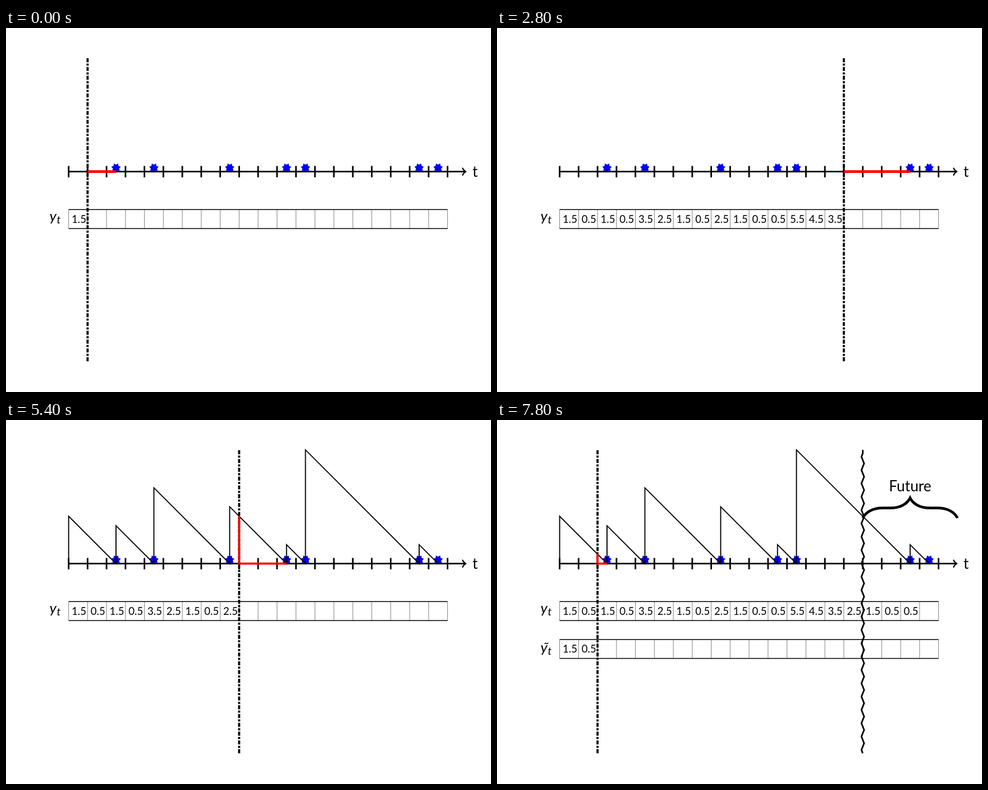
Recreate the animation shown at these times as an HTML page with a canvas. Size 864x648 px, loop 8 s.

```html
<!DOCTYPE html>
<html lang="en">
<head>
<meta charset="utf-8">
<title>Time to next event</title>
<style>
html, body { margin: 0; width: 100%; height: 100%; overflow: hidden; background: #fff; }
canvas { display: block; }
</style>
</head>
<body>
<canvas id="stage" width="864" height="648"></canvas>
<script>
const ctx = document.getElementById('stage').getContext('2d');
const STEP = 200, LOOP = 8000;
const PT = 2.372;               // one typographic point in pixels
const U = 33.75;                // one time unit in pixels
const X0 = 111.6, Y0 = 255.7;   // origin of the time axis
const CELLS = 20;
const NOW = 16;
const EVENTS = [2.5, 4.5, 8.5, 11.5, 12.5, 18.5, 19.5];

const px = t => X0 + t * U;
const py = v => Y0 - v * U;
const nextEvent = t => EVENTS.find(e => e > t);

function stroke(points, width, color = '#000', dash = []) {
  ctx.beginPath();
  points.forEach(([x, y]) => ctx.lineTo(x, y));
  ctx.lineWidth = width;
  ctx.strokeStyle = color;
  ctx.setLineDash(dash);
  ctx.stroke();
  ctx.setLineDash([]);
}

function text(str, x, y, size, align = 'left', style = '') {
  ctx.font = `${style} ${size}px Lato, "Open Sans", sans-serif`;
  ctx.textAlign = align;
  ctx.fillStyle = '#000';
  ctx.fillText(str, x, y);
}

function star(cx, cy) {
  const points = 7, outer = 8.6, inner = 5.7;
  ctx.beginPath();
  for (let i = 0; i < points * 2; i++) {
    const a = Math.PI / 2 + i * Math.PI / points;
    const r = i % 2 ? inner : outer;
    ctx.lineTo(cx + r * Math.cos(a), cy + r * Math.sin(a));
  }
  ctx.fillStyle = '#00f';
  ctx.fill();
}

function axis() {
  const w = 1.2 * PT, end = px(21), tip = end - 0.96 * PT, a = 0.64 * PT;
  stroke([[px(0), Y0], [tip, Y0]], w);
  for (let i = 0; i <= CELLS; i++) stroke([[px(i), py(0.3)], [px(i), py(-0.3)]], w);
  ctx.save();
  ctx.translate(tip, Y0);
  ctx.lineCap = ctx.lineJoin = 'round';
  ctx.lineWidth = 0.8 * w;
  ctx.strokeStyle = '#000';
  ctx.beginPath();
  ctx.moveTo(-3 * a, -4 * a);
  ctx.bezierCurveTo(-2.75 * a, -2.5 * a, 0, -0.25 * a, 0.75 * a, 0);
  ctx.bezierCurveTo(0, 0.25 * a, -2.75 * a, 2.5 * a, -3 * a, 4 * a);
  ctx.stroke();
  ctx.restore();
  text('t', 831, 264.5, 26);
}

function row(level, filled) {
  const top = py(level), bottom = py(level - 1);
  for (let i = 0; i <= CELLS; i++) stroke([[px(i), top], [px(i), bottom]], 0.5);
  for (const y of [top, bottom]) stroke([[px(0), y], [px(CELLS), y]], 0.6 * PT);
  for (let i = 1; i <= filled; i++) {
    text((nextEvent(i) - i).toFixed(1), px(i - 1) + 18.4, top + 23.4, 18.5, 'center');
  }
}

function rowLabel(baseline) {
  text('y', 77.5, baseline, 26, 'left', 'italic');
  text('t', 90.5, baseline + 4, 19, 'left', 'italic');
}

function sawtooth() {
  const points = [];
  [0, ...EVENTS].forEach((e, i, all) => {
    points.push([px(e), Y0]);
    if (i < all.length - 1) points.push([px(e), py(all[i + 1] - e)]);
  });
  stroke(points, 0.8 * PT);
}

function zigzag() {
  const x = px(NOW), top = py(6), bottom = py(-10);
  const half = 5 * PT, amp = PT;
  const count = Math.floor((bottom - top) / half);
  const points = [[x, bottom]];
  for (let i = 0; i < count; i++) {
    points.push([x + (i % 2 ? amp : -amp), bottom - (i + 0.5) * half]);
  }
  points.push([x, bottom - count * half], [x, top]);
  stroke(points, 1.2 * PT);
}

function brace() {
  const a = 15 * PT, half = 2.5 * U;
  ctx.save();
  ctx.translate(px(NOW) + half, 174.5);
  ctx.lineWidth = 2 * PT;
  ctx.strokeStyle = '#000';
  ctx.beginPath();
  ctx.moveTo(-half, 0);
  ctx.bezierCurveTo(-half + 0.15 * a, -0.3 * a, -half + 0.5 * a, -0.5 * a, -half + a, -0.5 * a);
  ctx.lineTo(-a, -0.5 * a);
  ctx.bezierCurveTo(-0.5 * a, -0.5 * a, -0.15 * a, -0.7 * a, 0, -a);
  ctx.bezierCurveTo(0.15 * a, -0.7 * a, 0.5 * a, -0.5 * a, a, -0.5 * a);
  ctx.lineTo(half - a, -0.5 * a);
  ctx.bezierCurveTo(half - 0.5 * a, -0.5 * a, half - 0.15 * a, -0.3 * a, half, 0);
  ctx.stroke();
  ctx.restore();
  text('Future', px(NOW) + half, 127.3, 26.3, 'center');
}

function draw(ms) {
  // Two full sweeps of 19 steps, then the start of a third
  const n = Math.floor(ms % LOOP / STEP);
  const sweep = Math.floor(n / 19);
  const k = n % 19 + 1;
  const next = nextEvent(k);

  ctx.fillStyle = '#fff';
  ctx.fillRect(0, 0, 864, 648);

  EVENTS.forEach(e => star(px(e), py(0.2)));
  axis();
  row(-2, sweep < 2 ? k : 19);
  rowLabel(344);
  if (sweep > 0) sawtooth();
  if (sweep > 1) {
    row(-4, k);
    rowLabel(414);
    text('\u02dc', 86, 414, 26, 'center', 'italic');
    zigzag();
    brace();
  }

  const w = 1.6 * PT;
  stroke([[px(k), py(-10)], [px(k), py(6)]], w, '#000', [3 * PT, PT, w, PT]);
  const path = [[px(k), Y0], [px(next), Y0]];
  if (sweep > 0) path.unshift([px(k), py(next - k)]);
  stroke(path, sweep > 0 ? w : 2 * PT, '#f00');
}

const start = performance.now();
function tick() {
  draw(performance.now() - start);
  requestAnimationFrame(tick);
}
tick();
</script>
</body>
</html>
```
